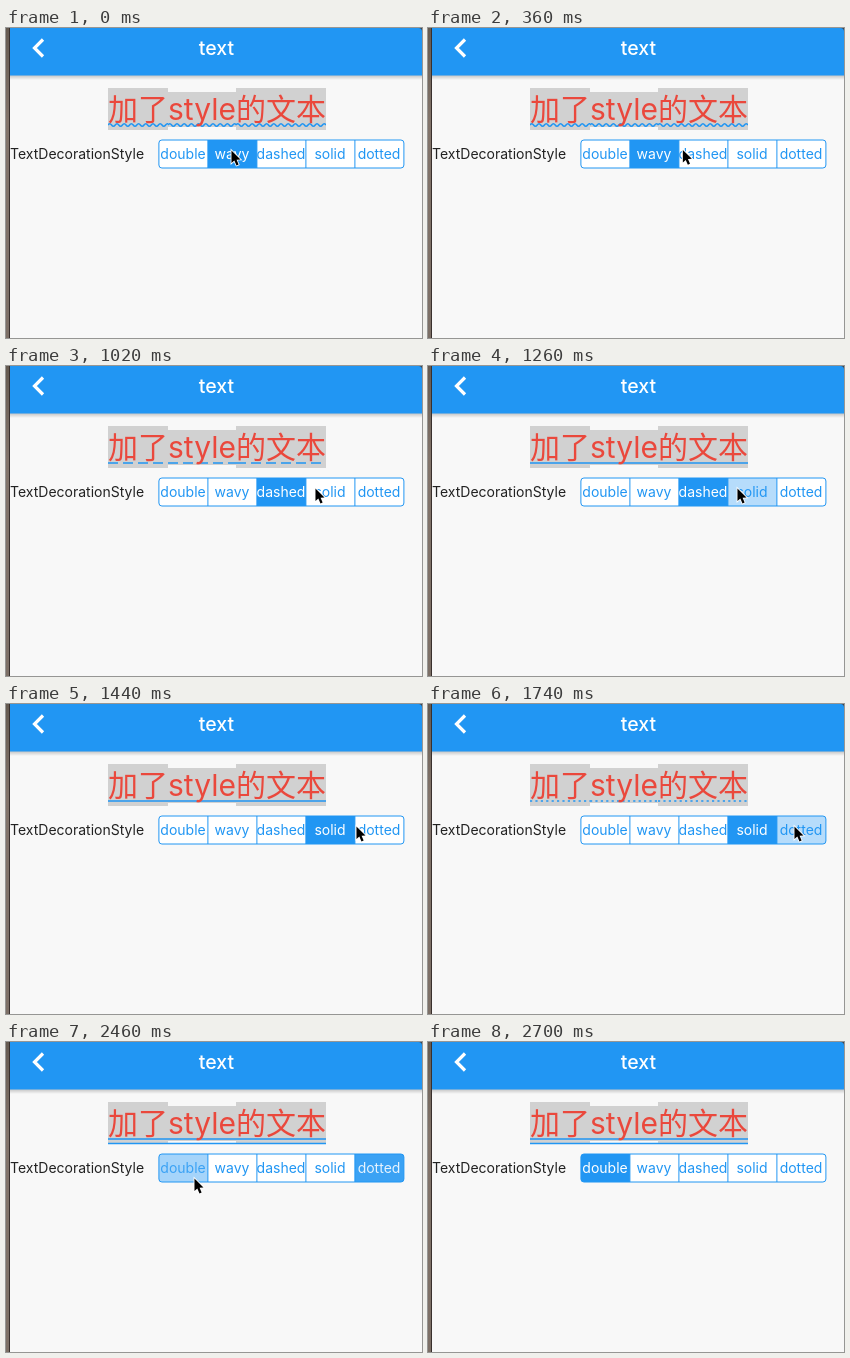
Write an HTML page with a canvas that moves like this. It is 416 px wide and 310 px high and loops after 2940 ms.

```html
<!DOCTYPE html>
<html lang="zh-CN">
<head>
<meta charset="utf-8">
<title>text</title>
<style>
html, body { margin: 0; width: 100%; height: 100%; overflow: hidden; background: #f8f8f8; }
canvas { display: block; width: 416px; height: 310px; }
</style>
</head>
<body>
<canvas id="stage" width="416" height="310"></canvas>
<script>
const ctx = document.getElementById('stage').getContext('2d');
const LOOP = 2940, STEP = 60;
const BLUE = [33, 150, 243], WHITE = [255, 255, 255];
const FONT = 'Inter, "Noto Sans CJK SC", "Noto Sans CJK", sans-serif';
const styles = ['double', 'wavy', 'dashed', 'solid', 'dotted'];
const bar = { x: 152.9, y: 112, w: 245, h: 28 };

// Each tap: pointer down, then release, which changes the style and starts the fade.
const taps = [
  { down: 540, up: 600, index: 2 },
  { down: 1200, up: 1260, index: 3 },
  { down: 1680, up: 1740, index: 4 },
  { down: 2400, up: 2400, index: 0 }
];
const FADE_DELAY = 45, FADE = 130, PRESSED = 0.33;

// Pointer path: time, x, y.
const path = [
  [0, 225, 122], [60, 225, 122], [540, 272, 121], [720, 272, 121],
  [1020, 309, 122], [1260, 309, 122], [1440, 350, 122], [1620, 366, 122],
  [1740, 366, 122], [1980, 231, 127], [2220, 190, 129], [2400, 189, 130],
  [2460, 188, 136], [2640, 178, 267]
];

const clamp = v => Math.max(0, Math.min(1, v));
const mix = (a, b, k) => a + (b - a) * k;
const blend = (a, b, k) => `rgb(${a.map((v, i) => Math.round(mix(v, b[i], k)))})`;
const blue = blend(BLUE, BLUE, 0);

function rect(color, x, y, w, h) {
  ctx.fillStyle = color;
  ctx.fillRect(x, y, w, h);
}

function text(str, x, y, size, color, align = 'left', weight = 400) {
  ctx.font = `${weight} ${size}px ${FONT}`;
  ctx.textAlign = align;
  ctx.fillStyle = color;
  ctx.fillText(str, x, y);
}

function line(x1, x2, y, dash = []) {
  ctx.lineWidth = 1.5;
  ctx.setLineDash(dash);
  ctx.beginPath();
  ctx.moveTo(x1, y);
  ctx.lineTo(x2, y);
  ctx.stroke();
  ctx.setLineDash([]);
}

function wave(x1, x2, y) {
  const half = 3.6;
  ctx.save();
  ctx.beginPath();
  ctx.rect(x1, y - 6, x2 - x1, 12);
  ctx.clip();
  ctx.beginPath();
  ctx.moveTo(x1, y);
  for (let x = x1, up = -1; x < x2; x += half, up = -up) {
    ctx.quadraticCurveTo(x + half / 2, y + up * 2.6, x + half, y);
  }
  ctx.lineWidth = 1.5;
  ctx.stroke();
  ctx.restore();
}

function underline(style, x1, x2) {
  const y = 97;
  ctx.strokeStyle = blue;
  if (style === 'wavy') wave(x1, x2, y);
  else if (style === 'dashed') line(x1, x2, y, [10, 5]);
  else if (style === 'dotted') line(x1, x2, y, [2.2, 3.2]);
  else line(x1, x2, y);
  if (style === 'double') line(x1, x2, 101.5);
}

function drawPage() {
  rect('#f8f8f8', 0, 0, 416, 310);
  const shadow = ctx.createLinearGradient(0, 47, 0, 52);
  shadow.addColorStop(0, 'rgba(0,0,0,.22)');
  shadow.addColorStop(1, 'rgba(0,0,0,0)');
  rect(shadow, 4, 47, 412, 5);
  rect(blue, 4, 0, 412, 47.5);

  const edge = ctx.createLinearGradient(0, 0, 0, 310);
  edge.addColorStop(0, '#655a50');
  edge.addColorStop(0.3, '#82746a');
  edge.addColorStop(1, '#7c6f66');
  rect(edge, 0, 0, 3, 310);
  rect('#39302d', 3, 0, 1, 310);

  ctx.fillStyle = '#42454b';
  ctx.beginPath();
  ctx.moveTo(412.5, 0);
  ctx.quadraticCurveTo(416, 0, 416, 3.5);
  ctx.lineTo(416, 0);
  ctx.fill();

  ctx.strokeStyle = '#fff';
  ctx.lineWidth = 3.2;
  ctx.beginPath();
  ctx.moveTo(37, 11.5);
  ctx.lineTo(28.5, 20);
  ctx.lineTo(37, 28.5);
  ctx.stroke();
  text('text', 210.5, 27, 19.5, '#fff', 'center', 500);
  text('TextDecorationStyle', 4, 131, 14, '#222');
}

function drawSample(style) {
  const runs = [['加了', 102, 162, 60, 102], ['style', 162, 230, 64, 99], ['的文本', 230, 320, 60, 102]];
  for (const [, x1, x2, top, bottom] of runs) rect('#d1d1d1', x1, top, x2 - x1, bottom - top);
  for (const [str, x1, x2] of runs) {
    underline(style, x1, x2);
    text(str, x1, 92, 30, '#ea483c');
  }
}

function segmentLevels(t) {
  const fill = [0, 1, 0, 0, 0], label = [0, 1, 0, 0, 0];
  let current = 1;
  for (const { down, up, index } of taps) {
    if (t < down) break;
    const k = clamp((t - up - FADE_DELAY) / FADE);
    fill[index] = mix(PRESSED, 1, k);
    label[index] = k;
    fill[current] = label[current] = 1 - k;
    if (t >= up) current = index;
  }
  return { fill, label, current };
}

function drawSegments({ fill, label }) {
  const { x, y, w, h } = bar, cell = w / styles.length;
  ctx.save();
  ctx.beginPath();
  ctx.roundRect(x, y, w, h, 3);
  ctx.clip();
  styles.forEach((_, i) => rect(blend(WHITE, BLUE, fill[i]), x + i * cell, y, cell + 0.5, h));
  ctx.restore();

  ctx.strokeStyle = blue;
  ctx.lineWidth = 1;
  ctx.beginPath();
  ctx.roundRect(x, y, w, h, 3);
  for (let i = 1; i < styles.length; i++) {
    ctx.moveTo(x + i * cell, y);
    ctx.lineTo(x + i * cell, y + h);
  }
  ctx.stroke();
  styles.forEach((name, i) =>
    text(name, x + (i + 0.5) * cell - 0.4, 131, 14, blend(BLUE, WHITE, label[i]), 'center'));
}

function drawPointer(t) {
  const next = path.findIndex(p => p[0] > t);
  if (next < 0 && t > path[path.length - 1][0]) return;
  const b = path[next < 0 ? path.length - 1 : next];
  const a = next < 0 ? b : path[next - 1];
  const k = a === b ? 0 : (t - a[0]) / (b[0] - a[0]);
  ctx.save();
  ctx.translate(mix(a[1], b[1], k), mix(a[2], b[2], k) + 0.5);
  ctx.scale(0.93, 0.93);
  ctx.beginPath();
  [[0.5, 0], [0.5, 13.5], [3.6, 10.8], [5.9, 16], [8.2, 15], [6, 9.9], [10.2, 9.6]]
    .forEach(([x, y]) => ctx.lineTo(x, y));
  ctx.closePath();
  ctx.lineWidth = 1.8;
  ctx.strokeStyle = '#fff';
  ctx.stroke();
  ctx.fillStyle = '#000';
  ctx.fill();
  ctx.restore();
}

function frame() {
  const t = Math.floor((performance.now() % LOOP) / STEP) * STEP;
  const levels = segmentLevels(t);
  drawPage();
  drawSample(styles[levels.current]);
  drawSegments(levels);
  drawPointer(t);
  requestAnimationFrame(frame);
}
frame();
</script>
</body>
</html>
```
